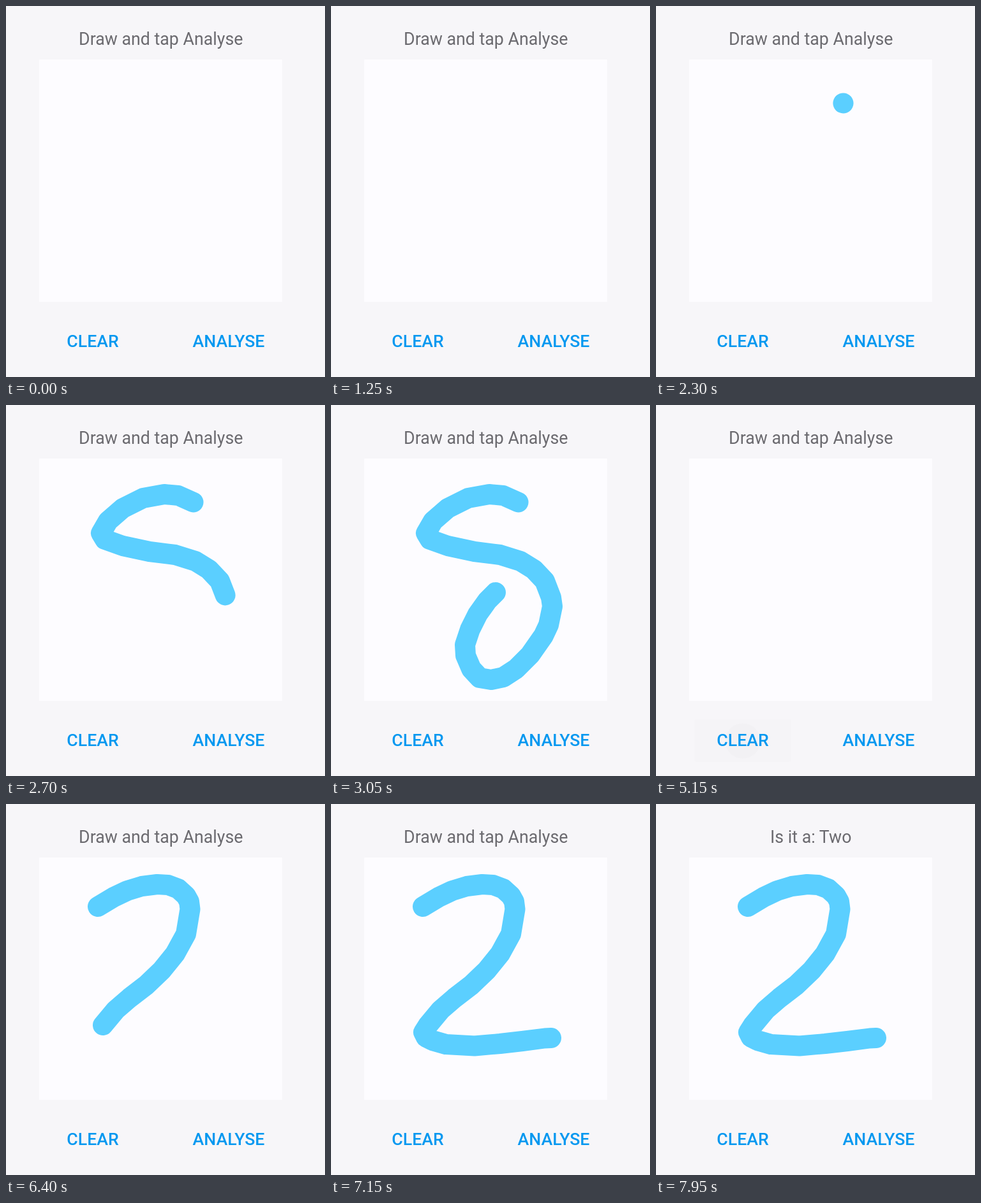
An HTML page that plays this animation: 500 by 582 pixels, repeating every 8 s.

```html
<!DOCTYPE html>
<html lang="en">
<head>
<meta charset="utf-8">
<title>Digit drawing</title>
<style>
  html, body { margin: 0; width: 100%; height: 100%; overflow: hidden; background: #f7f6f9; }
  svg { display: block; width: 500px; height: 582px; }
  text { font-family: Roboto, sans-serif; font-size: 26.75px; text-anchor: middle; fill: #6b6a6f; }
  .label { font-size: 26.7px; font-weight: 500; fill: #0598f0; }
  polyline { fill: none; stroke: #5bcfff; stroke-width: 32; stroke-linecap: round; stroke-linejoin: round; }
</style>
</head>
<body>
<svg viewBox="0 0 500 582">
  <defs>
    <clipPath id="clearArea"><rect x="60" y="493" width="152" height="67" rx="3"/></clipPath>
    <clipPath id="analyseArea"><rect x="273" y="493" width="152" height="67" rx="3"/></clipPath>
  </defs>
  <rect width="500" height="582" fill="#f7f6f9"/>
  <rect x="52" y="84" width="381" height="380" fill="#fdfcff"/>
  <polyline id="eight" points="293.5,152.5 270,142 248,140 215,146 183,162 160,182 149,201 155,211 183,221 225,230 265,235 297,245 318,258 335,276 345,302 347,316 341,345 333,362 312,392 290,414 270,427 251,431 233,428 220,414 211,393 210,376 218,352 230,328 245,307 258,294 286,270 318,240 345,214 355,195 354,178 341,157 322,143 302,134 281,132"/>
  <polyline id="two" points="144,161 169,146 190,136 213,129 237,126 254,127 270,133 282,144 287,153 288.5,165 282,204 265,235 244,261 220,284 194,304 172,323 152,347 145,358 149,366 159,371 180,377 225,379.5 265,376 300,372 335,367.5 345,367"/>
  <g id="clearRipple" clip-path="url(#clearArea)"><rect x="60" y="493" width="152" height="67"/><circle cx="136" cy="527"/></g>
  <g id="analyseRipple" clip-path="url(#analyseArea)"><rect x="273" y="493" width="152" height="67"/><circle cx="349" cy="527"/></g>
  <text id="title" x="242.75" y="61"></text>
  <text class="label" x="136" y="535">CLEAR</text>
  <text class="label" x="349" y="535">ANALYSE</text>
</svg>
<script>
const LOOP = 8000, STEP = 50;
const $ = id => document.getElementById(id);
const clamp01 = v => Math.max(0, Math.min(1, v));

// keys: [time, index of the vertex reached]
const strokes = [
  { id: 'eight', keys: [[2300, 0], [3050, 29], [3350, 38]], end: 5100 },
  { id: 'two', keys: [[6000, 0], [6400, 16], [6650, 25]], end: LOOP }
].map(stroke => {
  const el = $(stroke.id), pts = [...el.points], lengths = [0];
  for (let i = 1; i < pts.length; i++) {
    lengths.push(lengths[i - 1] + Math.hypot(pts[i].x - pts[i - 1].x, pts[i].y - pts[i - 1].y));
  }
  return { ...stroke, el, keys: stroke.keys.map(([time, index]) => [time, lengths[index]]) };
});

const titles = [
  [0, 'Draw and tap Analyse'],
  [4100, 'Is it a: Eight'],
  [5150, 'Draw and tap Analyse'],
  [7350, 'Is it a: Two']
];
const taps = [['analyseRipple', 3950], ['clearRipple', 5120], ['analyseRipple', 7200]];

function drawnLength(keys, t) {
  for (let i = 1; i < keys.length; i++) {
    const [t0, a] = keys[i - 1], [t1, b] = keys[i];
    if (t < t1) return a + (b - a) * (t - t0) / (t1 - t0);
  }
  return keys[keys.length - 1][1];
}

function drawRipple(id, age) {
  const group = $(id), [area, ring] = group.children;
  const level = clamp01(age / 120) * clamp01((330 - age) / 180);
  area.setAttribute('opacity', 0.03 * level);
  ring.setAttribute('opacity', 0.05 * level);
  ring.setAttribute('r', 20 + 65 * clamp01(age / 250));
}

function render(t) {
  for (const { el, keys, end } of strokes) {
    const visible = t >= keys[0][0] && t < end;
    el.style.display = visible ? '' : 'none';
    if (visible) el.setAttribute('stroke-dasharray', `${Math.max(0.1, drawnLength(keys, t))} 3000`);
  }
  const title = titles.filter(([start]) => t >= start).pop()[1];
  if ($('title').textContent !== title) $('title').textContent = title;
  for (const id of ['clearRipple', 'analyseRipple']) {
    const tap = taps.filter(([name, start]) => name === id && t >= start).pop();
    drawRipple(id, tap ? t - tap[1] : 0);
  }
}

const origin = performance.now();
function frame() {
  const t = (performance.now() - origin) % LOOP;
  render(Math.floor(t / STEP) * STEP);
  requestAnimationFrame(frame);
}
render(0);
requestAnimationFrame(frame);
</script>
</body>
</html>
```
